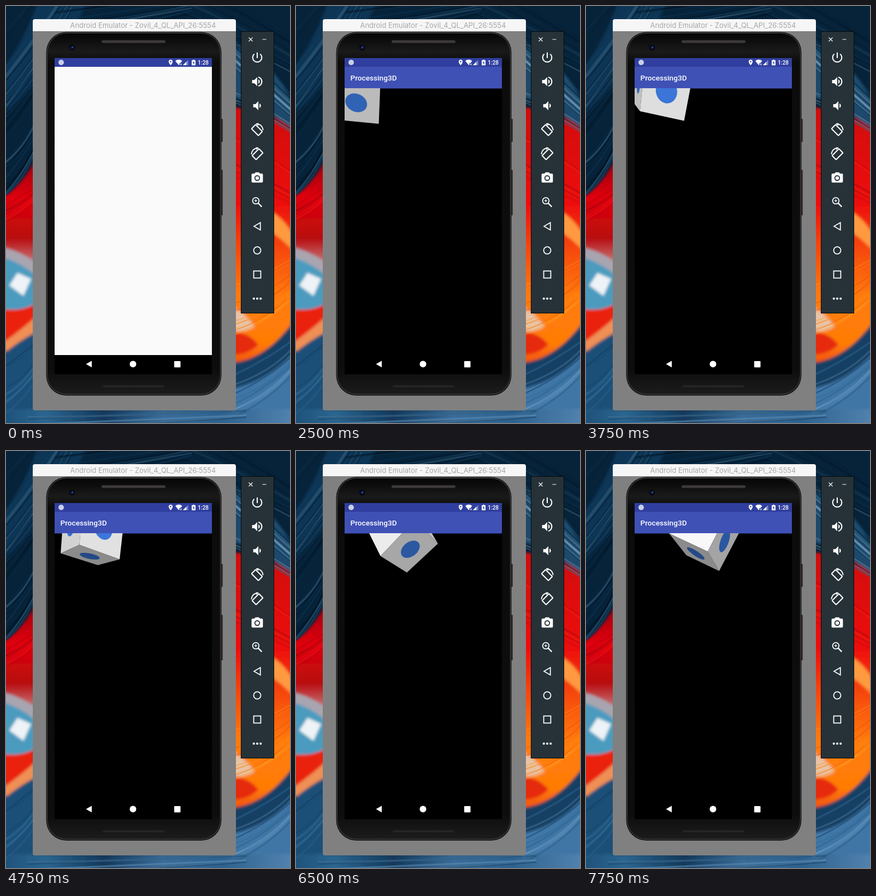
Animation of 520 by 761 pixels, one loop 8 s. Source, as an HTML page:

```html
<!DOCTYPE html>
<html lang="en">
<head>
<meta charset="utf-8">
<title>Emulator</title>
<style>
html, body { margin: 0; width: 100%; height: 100%; overflow: hidden; background: #08243a; }
svg { display: block; width: 520px; height: 761px; }
</style>
</head>
<body>
<svg id="stage" viewBox="0 0 520 761" xmlns="http://www.w3.org/2000/svg">
  <defs>
    <linearGradient id="redL" x2="0" y2="1">
      <stop offset="0" stop-color="#8d0612"/><stop offset=".4" stop-color="#e00308"/>
      <stop offset=".75" stop-color="#b80a10"/><stop offset="1" stop-color="#c98a88"/>
    </linearGradient>
    <linearGradient id="warmR" x2="0" y2="1">
      <stop offset="0" stop-color="#cf0810"/><stop offset=".35" stop-color="#ee0b08"/>
      <stop offset=".5" stop-color="#f4400a"/><stop offset=".7" stop-color="#ff7a08"/>
      <stop offset=".88" stop-color="#ff7c06"/><stop offset="1" stop-color="#e8350c"/>
    </linearGradient>
    <linearGradient id="foot">
      <stop offset="0" stop-color="#1c5078"/><stop offset=".15" stop-color="#2b6690"/>
      <stop offset=".35" stop-color="#12385a"/><stop offset=".55" stop-color="#3a6c98"/>
      <stop offset=".75" stop-color="#2d628f"/><stop offset="1" stop-color="#5484b0"/>
    </linearGradient>
    <linearGradient id="shell" x2="0" y2="1">
      <stop offset="0" stop-color="#050505"/><stop offset=".05" stop-color="#1a1a1a"/>
      <stop offset=".08" stop-color="#0c0c0c"/><stop offset=".93" stop-color="#0d0d0d"/>
      <stop offset="1" stop-color="#1c1c1c"/>
    </linearGradient>
    <filter id="soft" x="-5%" y="-5%" width="110%" height="110%"><feGaussianBlur stdDeviation="2.5"/></filter>
    <filter id="hair" filterUnits="userSpaceOnUse" x="0" y="0" width="520" height="761"><feGaussianBlur stdDeviation=".7"/></filter>
    <clipPath id="view"><rect x="89" y="150" width="288" height="487"/></clipPath>
  </defs>

  <!-- wallpaper -->
  <rect width="520" height="761" fill="#06233a"/>
  <g filter="url(#soft)">
    <path d="M-10 120Q30 70 60 -10H150Q90 120 -10 200Z" fill="#0c3654"/>
    <path d="M-10 352Q30 330 60 268V475H-10Z" fill="url(#redL)"/>
    <path d="M-10 442Q28 448 60 472V565H-10Z" fill="#4b9bbf"/>
    <path d="M-10 458Q25 466 60 496V472Q25 446 -10 440Z" fill="#a8a5b0"/>
    <path d="M6 510L21 487L46 498L32 529Z" fill="#edf3f6"/>
    <path d="M-10 552Q28 560 60 540V630H-10Z" fill="#ea2408"/>
    <path d="M-10 618Q30 590 60 562V630H-10Z" fill="#ef8f55"/>
    <path d="M-10 640Q18 614 60 592V780H-10Z" fill="#1b5078"/>
    <path d="M405 70Q490 90 530 190V235Q480 180 405 165Z" fill="#1a4a6c"/>
    <path d="M405 185Q480 185 530 230V675H405Z" fill="url(#warmR)"/>
    <path d="M485 375Q512 390 530 425V450Q505 425 485 412Z" fill="#ff9a40"/>
    <path d="M405 545Q440 560 455 585Q430 600 405 590Z" fill="#e8c3a6"/>
    <path d="M405 598Q440 590 462 618Q440 640 405 635Z" fill="#e62c0c"/>
    <path d="M405 652Q475 650 530 570V780H405Z" fill="#123f64"/>
    <path d="M405 700Q475 690 530 630V780H405Z" fill="#3f76a6"/>
    <rect x="-10" y="736" width="540" height="40" fill="url(#foot)"/>
  </g>
  <g id="strands" fill="none" filter="url(#hair)"></g>

  <!-- window -->
  <path d="M49 46H421V734Q421 738 417 738H53Q49 738 49 734Z" fill="#808080"/>
  <path d="M49 46V28Q49 24 53 24H417Q421 24 421 28V46Z" fill="#f6f6f6"/>
  <text x="117.5" y="40" font-family="Inter, sans-serif" font-size="12.92" fill="#a6a6a6">Android Emulator - Zovil_4_QL_API_26:5554</text>

  <!-- phone -->
  <g fill="#3b302d">
    <rect x="393" y="206" width="4" height="42" rx="1"/>
    <rect x="393" y="299" width="4" height="83" rx="1"/>
  </g>
  <rect x="73.500" y="47.500" width="321" height="663.500" rx="37" fill="#191919"/>
  <rect x="75.500" y="49.500" width="317" height="659" rx="35.500" fill="url(#shell)" stroke="#474747"/>
  <rect x="175" y="62.500" width="117" height="5" rx="2.500" fill="#3d3a39"/>
  <rect x="177" y="692" width="113" height="4" rx="2" fill="#242424"/>
  <circle cx="121" cy="76" r="5.500" fill="#070a14"/>
  <circle cx="121" cy="76" r="2.500" fill="#14245c"/>
  <circle cx="122" cy="75" r="1" fill="#4c68c0"/>

  <!-- screen -->
  <rect x="89" y="95" width="288" height="577" fill="#000"/>
  <rect id="blank" x="89" y="111" width="288" height="526" fill="#fafafa"/>
  <g id="app">
    <rect x="89" y="111" width="288" height="39.500" fill="#3f51b5"/>
    <text x="99.500" y="136.200" font-family="Roboto, sans-serif" font-weight="500" font-size="13.650" fill="#fff">Processing3D</text>
    <g id="cube" clip-path="url(#view)"></g>
  </g>
  <rect x="89" y="95" width="288" height="16" fill="#303f9f"/>
  <g fill="#fff">
    <circle cx="101" cy="103" r="5" fill="#c9cfe8"/>
    <path d="M301.500 98a3.600 3.600 0 0 1 3.600 3.600c0 2.700-3.600 6.600-3.600 6.600s-3.600-3.900-3.600-6.600a3.600 3.600 0 0 1 3.600-3.600zm0 2.300a1.300 1.300 0 1 0 0 2.600a1.300 1.300 0 1 0 0-2.600z"/>
    <path d="M310 100.200Q316.300 95.500 322.500 100.200L319.500 104H317.500V106.500L316.300 108Z"/>
    <path d="M318.800 105l3 3m0-3l-3 3" stroke="#fff"/>
    <path d="M333.500 98.500V108H324Z" opacity=".4"/>
    <path d="M330 102V108H324Z"/>
    <path d="M342 98h3v1h2v9.200h-7V99h2z"/>
    <path d="M344.200 100.300l-2.500 3.700h1.600v3l2.300-3.700h-1.500z" fill="#303f9f"/>
    <text x="351.300" y="106.700" font-family="Roboto, sans-serif" font-weight="500" font-size="10">1:28</text>
    <path d="M146.500 653.500L157 647.500V659.500Z"/>
    <circle cx="232.500" cy="653.500" r="6"/>
    <rect x="308" y="648" width="11.500" height="11.500" rx="1"/>
  </g>

  <!-- tool panel -->
  <rect x="430.500" y="46.500" width="60" height="514" fill="#263238" stroke="#05090b"/>
  <path d="M444.500 57.500l7 7m0-7l-7 7M469.500 61h7" stroke="#fff" stroke-width="1.200"/>
  <g id="tools" fill="#fff"></g>
</svg>
<script>
const $ = id => document.getElementById(id);
const line = 'fill="none" stroke="#fff" stroke-width="1.7"';
const turn = `<g ${line}><rect x="3" y="7.500" width="17" height="10" rx="1" transform="rotate(45 11.500 12.500)" stroke-width="2"/>
  <path d="M10 1.600Q20.500 1.500 22.400 12.500"/><path d="M9.500 1.200L14 0V5Z" fill="#fff" stroke="none"/></g>`;
const tools = [
  '<path d="M13 3h-2v10h2V3zm4.830 2.170l-1.420 1.420A6.920 6.920 0 0 1 19 12a7 7 0 0 1-14 0c0-2.200 1-4.140 2.580-5.420L6.170 5.170A8.930 8.930 0 0 0 3 12a9 9 0 0 0 18 0c0-2.740-1.230-5.180-3.170-6.830z"/>',
  '<path d="M3 9v6h4l5 5V4L7 9zm13.500 3A4.500 4.500 0 0 0 14 8v8a4.500 4.500 0 0 0 2.500-4zM14 3.200v2.100a7 7 0 0 1 0 13.400v2.100a9 9 0 0 0 0-17.600z"/>',
  '<path d="M5 9v6h4l5 5V4L9 9zm13.500 3A4.500 4.500 0 0 0 16 8v8a4.500 4.500 0 0 0 2.500-4z"/>',
  turn,
  `<g transform="matrix(-1 0 0 1 24 0)">${turn}</g>`,
  '<path d="M9 2L7.200 4H4a2 2 0 0 0-2 2v12a2 2 0 0 0 2 2h16a2 2 0 0 0 2-2V6a2 2 0 0 0-2-2h-3.200L15 2zm3 15a5 5 0 1 1 0-10a5 5 0 0 1 0 10z"/><circle cx="12" cy="12" r="3.200"/>',
  `<g ${line}><circle cx="9.500" cy="9.500" r="5.600"/><path d="M13.500 13.500L20 20" stroke-width="2.300"/><path d="M9.500 7v5M7 9.500h5" stroke-width="1.200"/></g>`,
  `<path ${line} d="M6.300 12L17.500 5.500V18.500Z"/>`,
  `<circle ${line} cx="12" cy="12" r="6.300"/>`,
  `<rect ${line} x="5.800" y="5.800" width="12.400" height="12.400"/>`,
  '<circle cx="6" cy="12" r="2"/><circle cx="12" cy="12" r="2"/><circle cx="18" cy="12" r="2"/>'
];
$('tools').innerHTML = tools.map((t, i) =>
  `<g transform="translate(460 ${94 + 44 * i}) scale(1.04) translate(-12 -12)">${t}</g>`).join('');

// brush strands: bundles of nearly parallel curves
let seed = 7;
const rnd = () => (seed = seed * 16807 % 2147483647) / 2147483647;
function bundle(n, x0, y0, x1, y1, bend, spread, colors) {
  let out = '';
  for (let i = 0; i < n; i++) {
    const o = (rnd() - .5) * spread, b = bend + (rnd() - .5) * 10;
    const mx = (x0 + x1) / 2 + b, my = (y0 + y1) / 2 + b + o;
    out += `<path d="M${x0} ${y0 + o}Q${mx} ${my} ${x1} ${y1 + o * .8}" stroke="${colors[i % colors.length]}"
      stroke-width="${1 + rnd() * 3}" opacity="${.15 + rnd() * .4}"/>`;
  }
  return out;
}
const navy = ['#17496b', '#02111f', '#0e3857', '#02111f', '#4a7690'];
$('strands').innerHTML =
  bundle(24, -5, 150, 120, -30, 8, 200, navy) +
  bundle(14, -5, 320, 55, 235, 8, 70, navy) +
  bundle(14, 90, 30, 340, -8, 6, 60, navy) +
  bundle(14, 330, -10, 525, 90, -18, 80, navy) +
  bundle(14, 415, 80, 525, 180, -16, 70, ['#2c688e', '#041a2c', '#7fa6c0']) +
  bundle(8, 415, 165, 525, 225, -12, 20, ['#9ab2c2', '#38698c', '#0a2238']) +
  bundle(10, 415, 270, 525, 330, -12, 90, ['#ff2a10', '#a80810']) +
  bundle(10, 415, 560, 525, 500, 12, 110, ['#ffa52a', '#e8440a', '#ff8c10']) +
  bundle(14, 415, 712, 525, 640, 10, 80, ['#6f9cc4', '#1c4f78', '#2f6c9c']) +
  bundle(8, -5, 385, 55, 345, 4, 50, ['#f01818', '#9c060e']) +
  bundle(12, -5, 700, 55, 645, 6, 100, ['#3a7aa2', '#0d3858', '#2a6690']) +
  bundle(8, 40, 760, 440, 744, 4, 20, ['#5c8cb4', '#12395a']);

const LOOP = 8000, STEP = 250, OPEN = 1500;
const HALF = 40, DEPTH = 422, VX = 233, VY = 393.5, TOP = 150;
const ticks = [[1500, 3], [2500, 22.5], [3750, 49], [5750, 87.7], [7250, 120.5], [7750, 131]];

function tickAt(t) {
  let i = 0;
  while (i < ticks.length - 2 && t > ticks[i + 1][0]) i++;
  const [a, p] = ticks[i], [b, q] = ticks[i + 1];
  return p + (q - p) * (t - a) / (b - a);
}

function drawCube(n) {
  const a = n * .02, b = n * .01, cx = 89 + n;
  const sa = Math.sin(a), ca = Math.cos(a), sb = Math.sin(b), cb = Math.cos(b);
  const rot = ([x, y, z]) => {
    const v = y * ca - z * sa, w = y * sa + z * ca;
    return [x * cb + w * sb, v, w * cb - x * sb];
  };
  const project = p => {
    const [x, y, z] = rot(p), s = DEPTH / (DEPTH - z * HALF);
    return (VX + (cx + x * HALF - VX) * s).toFixed(2) + ',' + (VY + (TOP + y * HALF - VY) * s).toFixed(2);
  };
  const poly = (pts, rgb, k) =>
    `<polygon points="${pts.map(project).join(' ')}" fill="rgb(${rgb.map(c => Math.round(c * k))})"/>`;
  let out = '';
  for (let axis = 0; axis < 3; axis++) for (const side of [-1, 1]) {
    const at = (u, v) => {
      const p = [0, 0, 0];
      p[axis] = side; p[(axis + 1) % 3] = u; p[(axis + 2) % 3] = v;
      return p;
    };
    const m = rot(at(0, 0));
    if (m[0] * (VX - cx) + m[1] * (VY - TOP) + m[2] * DEPTH <= HALF) continue;
    const light = .55 + .45 * Math.max(0, m[2]);
    const ring = Array.from({ length: 32 }, (_, i) =>
      at(.46 * Math.cos(i * Math.PI / 16), .46 * Math.sin(i * Math.PI / 16)));
    out += poly([at(-1, -1), at(1, -1), at(1, 1), at(-1, 1)], [252, 252, 252], light)
      + poly(ring, [66, 133, 244], light);
  }
  $('cube').innerHTML = out;
}

let shown = -1;
function render(ms) {
  const t = Math.floor(ms % LOOP / STEP) * STEP;
  if (t === shown) return;
  shown = t;
  const open = t >= OPEN;
  $('blank').style.display = open ? 'none' : '';
  $('app').style.display = open ? '' : 'none';
  if (open) drawCube(tickAt(t));
}

const start = performance.now();
function loop() {
  render(performance.now() - start);
  requestAnimationFrame(loop);
}
loop();
</script>
</body>
</html>
```
